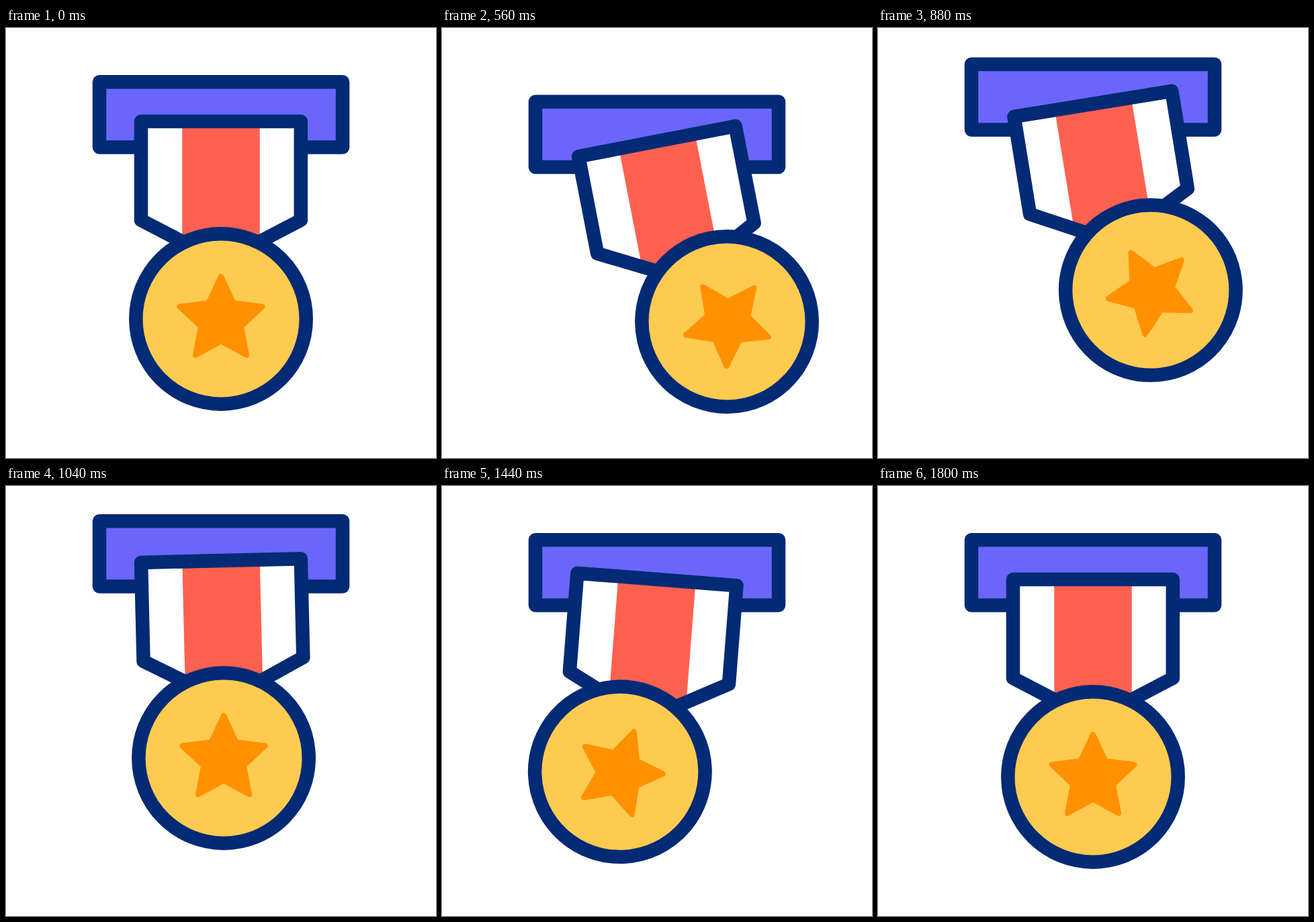
These frames come from a looping animation (640 by 640 pixels, 2 s). An HTML page:

```html
<!DOCTYPE html>
<html lang="en">
<head>
<meta charset="utf-8">
<title>Swinging medal</title>
<style>
  html, body { margin: 0; width: 100%; height: 100%; overflow: hidden; background: #fff; }
  svg { display: block; width: 100%; height: 100%; }
  .line { stroke: #032a75; stroke-width: 20.5; stroke-linejoin: round; }
</style>
</head>
<body>
<svg viewBox="0 0 640 640">
  <g id="all">
    <rect class="line" x="139" y="80.2" width="362" height="97.3" fill="#6b66f9"/>
    <g id="ribbon">
      <path d="M201 139H438.8V286L320 348L201 286Z" fill="#fff"/>
      <path d="M262.3 139H377.7V318L320 348L262.3 318Z" fill="#ff6150"/>
      <path class="line" d="M201 139H438.8V286L320 348L201 286Z" fill="none"/>
      <g id="medal">
        <circle class="line" cx="320" cy="433" r="126.7" fill="#fecb51"/>
        <polygon id="star" fill="#ff9100" stroke="#ff9100" stroke-width="8" stroke-linejoin="round"/>
      </g>
    </g>
  </g>
</svg>
<script>
const $ = id => document.getElementById(id);

$('star').setAttribute('points', Array.from({ length: 10 }, (_, i) => {
  const r = i % 2 ? 31.5 : 64.7, a = i * Math.PI / 5;
  return [320 + r * Math.sin(a), 434.7 - r * Math.cos(a)];
}).join(' '));

// Keys are [time in ms, value], eased in and out between neighbours
const lift = [[0, 0], [540, 30], [960, -32], [1320, 0]];
const swing = [[70, 0], [722, -13], [1275, 6], [1775, 0]];
const dangle = [[70, 0], [722, -28], [1275, 20], [1775, 0]];

function valueAt(keys, t) {
  const i = keys.findIndex(k => k[0] > t);
  if (i < 0) return keys[keys.length - 1][1];
  if (i === 0) return keys[0][1];
  const [t0, v0] = keys[i - 1], [t1, v1] = keys[i];
  const x = (t - t0) / (t1 - t0);
  return v0 + (v1 - v0) * x * x * (3 - 2 * x);
}

function draw(now) {
  const t = Math.floor(now % 2000 / 40) * 40;
  const place = (id, value) => $(id).setAttribute('transform', value);
  place('all', `translate(0 ${valueAt(lift, t)})`);
  place('ribbon', `rotate(${valueAt(swing, t)} 320 139)`);
  place('medal', `rotate(${valueAt(dangle, t)} 320 306)`);
}

const start = performance.now();
function loop() {
  draw(performance.now() - start);
  requestAnimationFrame(loop);
}
loop();
</script>
</body>
</html>
```
